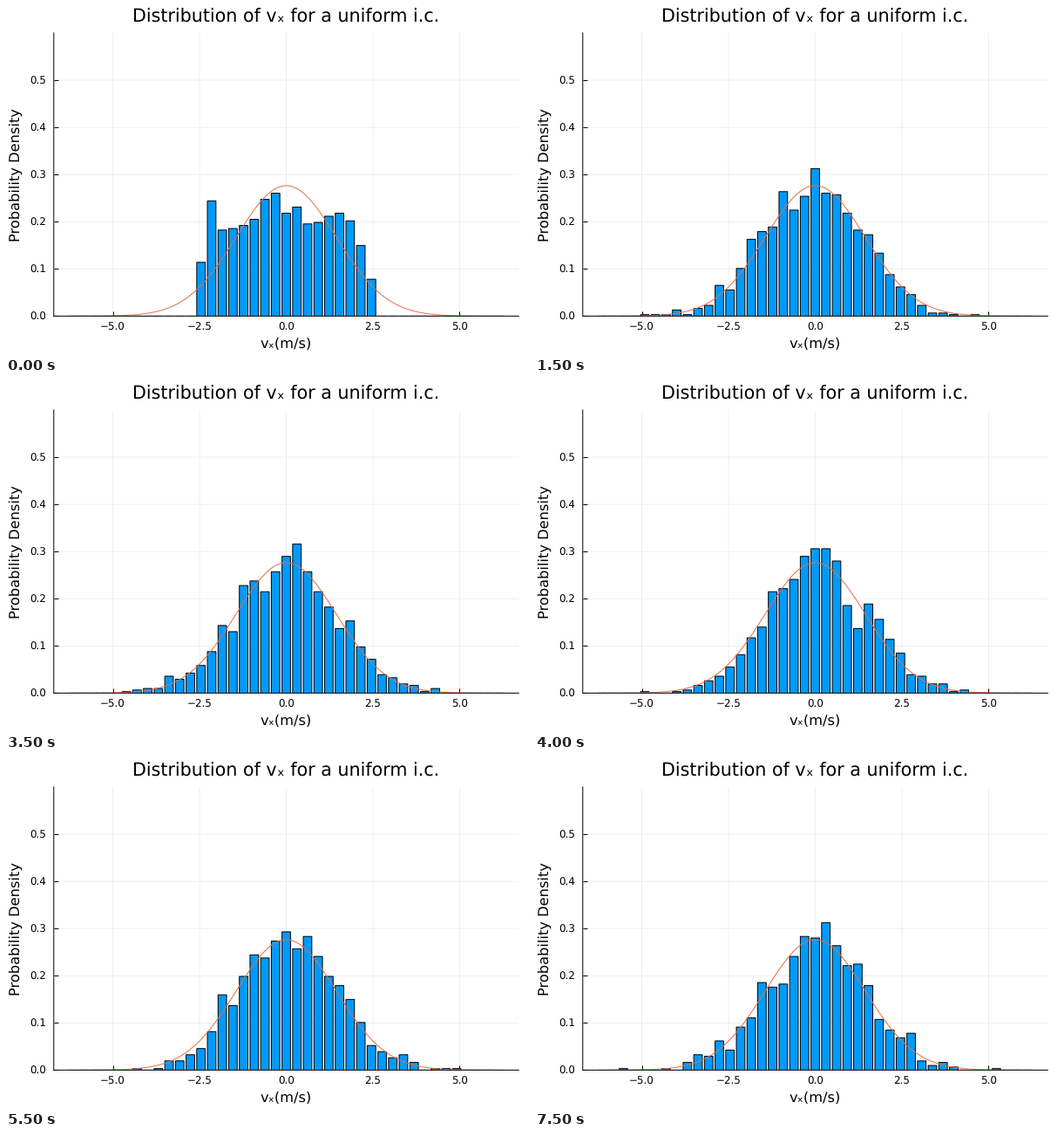
A matplotlib script that plays this animation: 600x400 px, repeating every 8 s.

```python
import numpy as np
import matplotlib.pyplot as plt
from matplotlib.animation import FuncAnimation

W, H = 600, 400
LEFT, RIGHT, TOP, BOTTOM = 54.8, 588.2, 30.9, 355.4
PX = 0.72                      # points per pixel at 100 dpi
FRAMES, STEP = 16, 500
XMAX, YMAX = 6.705, 0.6

N = 1024                       # particles
HALF, GAP = 20, 0.3073         # bins on each side, bin spacing
UNIT = 1 / (0.3 * N)           # density of a single particle
VMAX, SIGMA = 2.5, 1.443       # uniform start, thermal width
HIT = 0.6                      # share of particles scattered per step

plt.rcParams.update({"path.snap": False, "text.hinting": "none",
                     "font.family": "DejaVu Sans"})


def gauss(x):
    return np.exp(-x**2 / (2 * SIGMA**2)) / (SIGMA * np.sqrt(2 * np.pi))


def relax(seed=8):
    """Histogram of a uniform gas at each step as collisions thermalise it."""
    rng = np.random.default_rng(seed)
    edges = (np.arange(-HALF, HALF + 2) - 0.5) * GAP
    v = rng.uniform(-VMAX, VMAX, N)
    for _ in range(FRAMES):
        yield np.histogram(v, edges)[0] * UNIT
        hit = rng.random(N) < HIT
        v[hit] = rng.normal(0, SIGMA, hit.sum())


def text(x, y, s, size, ha="center", **kw):
    fig.text(x / W, 1 - y / H, s, fontsize=size * PX, ha=ha,
             va="baseline", **kw)


fig = plt.figure(figsize=(W / 100, H / 100), dpi=100, facecolor="white")
ax = fig.add_axes([LEFT / W, 1 - BOTTOM / H,
                   (RIGHT - LEFT) / W, (BOTTOM - TOP) / H])
xticks = np.arange(-5, 5.1, 2.5)
yticks = np.arange(6) / 10
ax.set(xlim=(-XMAX, XMAX), ylim=(0, YMAX), xticks=xticks, yticks=yticks)
ax.tick_params(direction="in", length=5 * PX, width=PX,
               labelbottom=False, labelleft=False)
ax.set_axisbelow(True)
ax.grid(color="black", alpha=0.1, linewidth=0.6 * PX)
ax.spines[["top", "right"]].set_visible(False)
ax.spines[["left", "bottom"]].set(linewidth=PX, zorder=1.5)

mid = (LEFT + RIGHT) / 2
text(mid, 18.5, "Distribution of vₓ for a uniform i.c.", 20.65)
text(mid, 392, "vₓ(m/s)", 16.3)
text(15.4, (TOP + BOTTOM) / 2 + 0.5, "Probability Density", 16.3,
     rotation=90, rotation_mode="anchor")
for x in xticks:
    text(mid + x / XMAX * (RIGHT - LEFT) / 2, 371.5,
         f"{x:.1f}".replace("-", "\u2212"), 11.9)
for y in yticks:
    text(46.6, BOTTOM - y / YMAX * (BOTTOM - TOP) + 4.4, f"{y:.1f}", 11.9,
         ha="right")

history = list(relax())
centers = np.arange(-HALF, HALF + 1) * GAP
bars = ax.bar(centers, history[0], width=0.8 * GAP, color="#009afa",
              edgecolor="black", linewidth=PX, zorder=2)
xs = np.linspace(centers[0], centers[-1], 400)
ax.plot(xs, gauss(xs), color="#e26f46", linewidth=PX, zorder=3)


def update(n):
    for bar, height in zip(bars, history[n]):
        bar.set_height(height)
    return bars.patches


anim = FuncAnimation(fig, update, frames=FRAMES, interval=STEP, repeat=True,
                     repeat_delay=0, blit=False)
plt.show()
```
